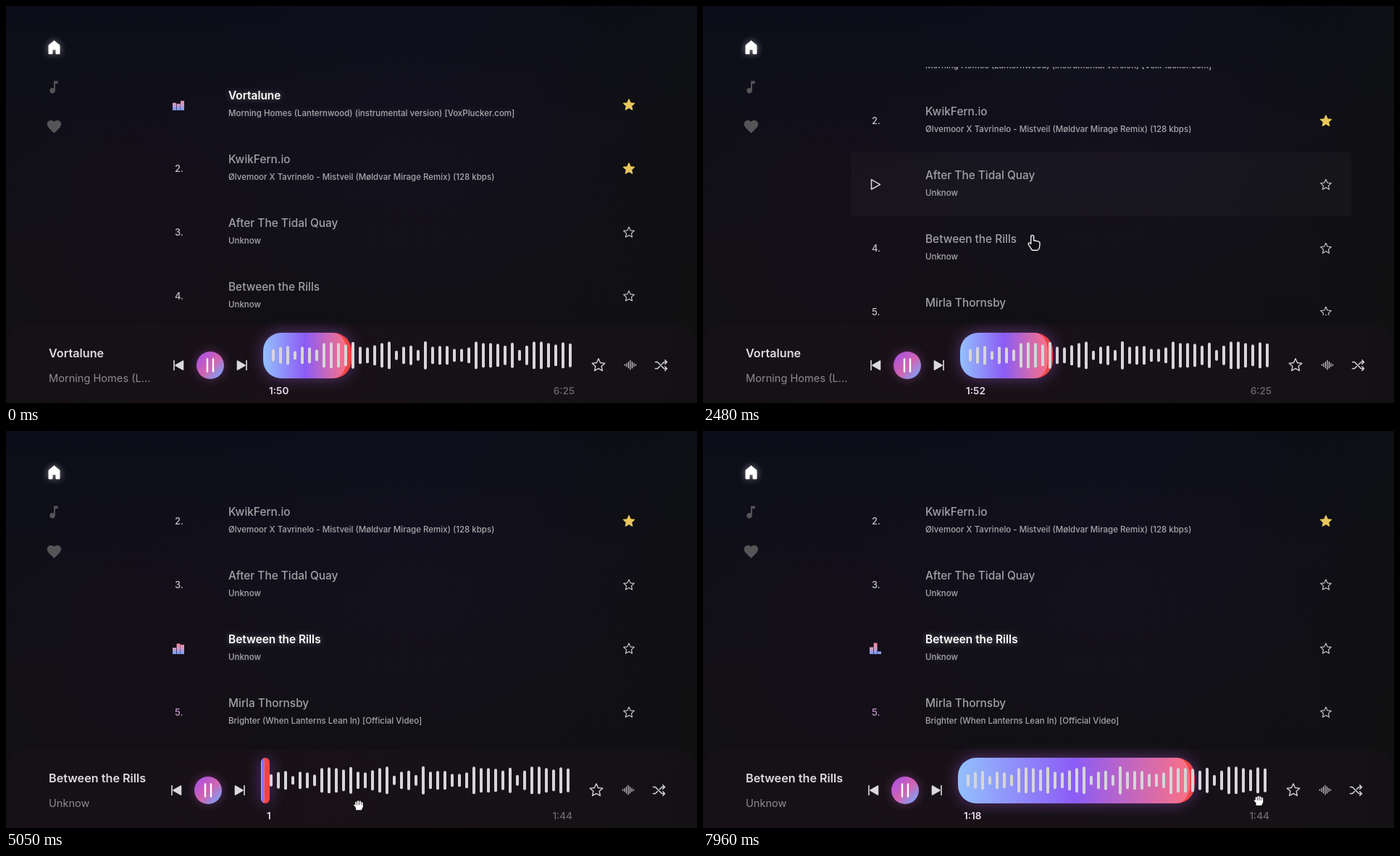
An HTML page for the animation above (8 s loop, 954 by 548 pixels).

```html
<!DOCTYPE html>
<html lang="en">
<head>
<meta charset="utf-8">
<title>Music player</title>
<style>
  html, body { margin: 0; width: 100%; height: 100%; overflow: hidden; background: #100f14; }
  #stage {
    position: relative; width: 954px; height: 548px; overflow: hidden;
    font-family: Inter, "Open Sans", sans-serif;
    background:
      radial-gradient(ellipse 190px 260px at 190px 310px, rgba(32, 12, 36, .22), transparent),
      radial-gradient(ellipse 360px 260px at 560px 190px, rgba(24, 18, 40, .4), transparent),
      linear-gradient(90deg, transparent 65%, rgba(15, 16, 16, .6)),
      linear-gradient(#0b0e1a, #100f18 30%, #121015 62%, #111013);
  }
  #player {
    position: absolute; left: 0; top: 440px; width: 954px; height: 108px;
    border-radius: 28px 28px 0 0;
    background: linear-gradient(90deg, #161117, #181217 45%, #141115);
  }
  #progress {
    position: absolute; top: 451px; height: 63px;
    border-right: 7px solid #ef4444; border-radius: 25px;
    background: linear-gradient(90deg, #93c0fd, #8b5cf6 50%, #fb7185);
    box-shadow: 0 0 20px rgba(160, 85, 215, .5);
  }
  #pause {
    position: absolute; top: 477px; width: 38px; height: 38px; border-radius: 50%;
    background: linear-gradient(135deg, #b153dc 15%, #d264b0 52%, #7f9ff5 88%);
    box-shadow: 0 0 14px rgba(190, 80, 190, .4);
  }
  svg { position: absolute; inset: 0; }
  text { white-space: pre; }
  .title { font-size: 15.4px; font-weight: 500; fill: #a1a1a4; }
  .sub { font-size: 11.5px; font-weight: 500; fill: #a8a8ab; }
  .num { font-size: 13px; font-weight: 500; fill: #c4c4c8; }
  .active .title { font-weight: 600; fill: #fff; filter: drop-shadow(0 0 4px rgba(255, 255, 255, .35)); }
  .active .sub { filter: drop-shadow(0 0 4px rgba(255, 255, 255, .12)); }
  .song { font-size: 16.2px; font-weight: 600; fill: #dcdcde; }
  .artist { font-size: 14.6px; fill: #8c8c90; }
  .time { font-size: 13.6px; font-weight: 600; fill: #e6dced; }
  .total { font-size: 13.6px; font-weight: 500; fill: #6c6a6e; }
  .line { fill: none; stroke: #d4d4d6; stroke-linecap: round; stroke-linejoin: round; }
</style>
</head>
<body>
<div id="stage">
  <div id="player"></div>
  <div id="progress"></div>
  <div id="pause"></div>
  <svg width="954" height="548" viewBox="0 0 954 548">
    <defs>
      <clipPath id="view"><rect x="200" y="84" width="700" height="343"/></clipPath>
      <linearGradient id="eqFill" gradientUnits="userSpaceOnUse" x1="0" y1="36" x2="0" y2="52">
        <stop offset="0" stop-color="#fb7f8f"/>
        <stop offset=".5" stop-color="#d29ac8"/>
        <stop offset="1" stop-color="#6f9dfa"/>
      </linearGradient>
    </defs>

    <path d="M59 54.2L66.5 48l7.5 6.2V66h-5v-6h-5v6h-5z" fill="#fff" stroke="#fff" stroke-linejoin="round"
      style="filter:drop-shadow(0 0 5px rgba(255,255,255,.5))"/>
    <g fill="#555457">
      <path transform="translate(54.5 100.5) scale(.96)"
        d="M12 3v10.55c-.59-.34-1.27-.55-2-.55-2.21 0-4 1.79-4 4s1.79 4 4 4 4-1.79 4-4V7h4V3z"/>
      <path transform="translate(54.8 154.8) scale(.97)"
        d="M12 21.35l-1.45-1.32C5.4 15.36 2 12.28 2 8.5 2 5.42 4.42 3 7.5 3c1.74 0 3.41.81 4.5 2.09C13.09 3.81 14.76 3 16.5 3 19.58 3 22 5.42 22 8.5c0 3.78-3.4 6.86-8.55 11.54z"/>
    </g>

    <g clip-path="url(#view)"><g id="list"></g></g>

    <text id="song" class="song" x="59" y="485"></text>
    <text id="artist" class="artist" x="59" y="519"></text>

    <g id="controls">
      <g fill="#dadadc" stroke="#dadadc" stroke-width="1.6" stroke-linejoin="round">
        <path d="M244.5 490v12l-10.5-6zM232 489v14"/>
        <path d="M319.5 490v12l10.5-6zM332 489v14"/>
      </g>
      <path d="M278 487.5v17M286 487.5v17" class="line" style="stroke:#fff" stroke-width="2.4"/>
      <g id="wave" fill="#d6d5d8"></g>
      <text id="time" class="time" x="363" y="536"></text>
      <text id="total" class="total" x="785" y="536" text-anchor="end"></text>
      <path id="playerStar" class="line" stroke-width="1.4" transform="translate(818 496)"/>
      <path class="line" stroke-width="1.2" transform="translate(862 495.5)"
        d="M-7.5-.7v1.4M-5-2.2v4.4M-2.5-4.2v8.4M0-6.3v12.6M2.5-4.2v8.4M5-2.2v4.4M7.5-.7v1.4"/>
      <path class="line" stroke-width="1.6" transform="translate(904.5 496)"
        d="M-8-4.5h3l9 9h4M-8 4.5h3l3-3M1-1.5l3-3h4M5.3-7.2L8-4.5 5.3-1.8M5.3 1.8L8 4.5 5.3 7.2"/>
    </g>

    <g id="cursor">
      <path id="pointer" fill="#0d0c12" stroke="#f2f2f2" stroke-width="1.4" stroke-linejoin="round"
        d="M-4.3-8.5a2 2 0 0 1 4 0V-3h1.8q4 .5 5.6 1.6 1.2.8 1 2.6L7.5 6q-.6 3.8-3.5 4.3H-1q-2 0-3-2.2L-7.5 2.4q-1-2 .8-2.5 1.3-.2 2.4 1.6z"/>
      <g id="grab" stroke="#fff" stroke-linecap="round" stroke-linejoin="round">
        <path stroke-width="2" d="M-3.2-4v5M-.4-5.2V1M2.4-4.8V1M5.1-3.2V1"/>
        <path fill="#fff" d="M-5.8 0l2.8 3.6V6.3h7l1.8-4V.5h-9.4z"/>
      </g>
    </g>
  </svg>
</div>

<script>
const LOOP = 8000, FRAME = 85.6, ROW = 88;
const SWITCH = 3500, GRAB = 4500, SEEK = 5700;
const $ = id => document.getElementById(id);

const rows = [
  { title: 'Vortalune', sub: 'Morning Homes (Lanternwood) (instrumental version) [VoxPlucker.com]', fav: true },
  { title: 'KwikFern.io', sub: 'Ølvemoor X Tavrinelo - Mistveil (Møldvar Mirage Remix) (128 kbps)', fav: true },
  { title: 'After The Tidal Quay', sub: 'Unknow', hover: [1790, 3330] },
  { title: 'Between the Rills', sub: 'Unknow', hover: [3330, 4270] },
  { title: 'Mirla Thornsby', sub: 'Brighter (When Lanterns Lean In) [Official Video]', hover: [4080, 4440] }
];
const waveHeights = [17, 23, 26, 12, 24, 22, 16, 34, 36, 34, 30, 37, 24, 22, 28, 34, 38, 13, 24, 27, 15,
  39, 24, 26, 26, 18, 18, 22, 38, 34, 34, 32, 27, 35, 15, 27, 38, 38, 34, 30, 36, 33];

// Each key is [time, value, ...]
const cursorKeys = [[1790, 500, 100], [1880, 462, 315], [2200, 457, 327], [4020, 457, 327], [4190, 411, 376],
  [4450, 425, 465], [4720, 465, 538], [4880, 480, 529], [5300, 496, 498], [5650, 498, 495],
  [6510, 561, 498], [6850, 624, 501], [7360, 651, 504], [7960, 767, 510]];
const progressKeys = [[0, 477], [2740, 484], [SWITCH, 484], [SWITCH, 359], [4190, 359], [5480, 367],
  [5650, 486], [5740, 499], [6510, 562], [6850, 624], [7360, 650], [7960, 679]];
const scrollKeys = [[2250, 0], [2400, 45], [2570, 88], [2740, 100]];

function track(keys, t) {
  const next = keys.findIndex(key => key[0] > t);
  if (next === 0) return keys[0].slice(1);
  if (next < 0) return keys[keys.length - 1].slice(1);
  const a = keys[next - 1], b = keys[next], k = (t - a[0]) / (b[0] - a[0]);
  return a.slice(1).map((v, i) => v + (b[i + 1] - v) * k);
}

function add(parent, tag, attrs, text = '') {
  const node = document.createElementNS('http://www.w3.org/2000/svg', tag);
  for (const name in attrs) node.setAttribute(name, attrs[name]);
  node.textContent = text;
  return parent.appendChild(node);
}

function starPath(radius) {
  let d = '';
  for (let i = 0; i < 10; i++) {
    const r = i % 2 ? radius * .47 : radius, a = i * Math.PI / 5;
    d += (i ? 'L' : 'M') + (r * Math.sin(a)).toFixed(2) + ' ' + (-r * Math.cos(a)).toFixed(2);
  }
  return d + 'z';
}

const clamp = v => Math.max(0, Math.min(1, v));
const clock = s => s < 60 ? `${s}` : `${Math.floor(s / 60)}:${String(s % 60).padStart(2, '0')}`;
const show = (node, on) => node.style.display = on ? '' : 'none';

rows.forEach((row, i) => {
  const g = row.node = add($('list'), 'g', { transform: `translate(0 ${92 + i * ROW})` });
  row.back = add(g, 'rect', { x: 205, width: 690, height: ROW, fill: '#fff' });
  row.num = add(g, 'text', { class: 'num', x: 233, y: 48.5 }, `${i + 1}.`);
  row.play = add(g, 'path', { class: 'line', 'stroke-width': 1.6, d: 'M232.5 37.5v13.4l12-6.7z' });
  row.eq = add(g, 'g', {});
  row.bars = [230, 235.6, 241].map(x => add(row.eq, 'rect', { x, width: 5 }));
  add(g, 'text', { class: 'title', x: 307, y: 36.5 }, row.title);
  add(g, 'text', { class: 'sub', x: 307, y: 60 }, row.sub);
  add(g, 'path', {
    d: starPath(row.fav ? 8 : 7.7), transform: 'translate(860 44.8)', 'stroke-linejoin': 'round',
    'stroke-width': 1.2, fill: row.fav ? '#e9c75c' : 'none', stroke: row.fav ? '#e9c75c' : '#c8c8ca'
  });
});
waveHeights.forEach((h, i) =>
  add($('wave'), 'rect', { x: 367 + i * 10, y: 482.3 - h / 2, width: 4, height: h, rx: 2 }));
$('playerStar').setAttribute('d', starPath(9.2));

function drawRow(row, i, t, current) {
  const active = i === current;
  const [on, off] = row.hover || [Infinity, Infinity];
  const hovered = t >= on && t < off;
  row.back.setAttribute('opacity', .023 * clamp((t - on + 90) / 90) * clamp((off + 90 - t) / 90));
  row.node.setAttribute('class', active ? 'active' : '');
  show(row.eq, active);
  show(row.play, hovered && !active);
  show(row.num, !hovered && !active);
  if (!active) return;
  const beat = current ? Math.max(t, 4020) : t;
  const speeds = [.0075, .0068, .0072], phases = current ? [3.1, -2, 3.9] : [.1, -.1, .6];
  row.bars.forEach((bar, n) => {
    const h = 9.7 + 6 * Math.sin(beat * speeds[n] + phases[n]);
    bar.setAttribute('y', 52 - h);
    bar.setAttribute('height', h);
  });
  row.eq.setAttribute('fill', current && t < 4300 ? '#b3a6c0' : 'url(#eqFill)');
}

function render(t) {
  const second = t >= SWITCH, current = second ? 3 : 0, shift = second ? -3 : 0;
  const left = 355 + shift, [end] = track(progressKeys, t);

  $('list').setAttribute('transform', `translate(0 ${-track(scrollKeys, t)[0]})`);
  rows.forEach((row, i) => drawRow(row, i, t, current));
  rows[4].num.style.fill = t > GRAB ? '#c79bcb' : '';

  $('controls').setAttribute('transform', `translate(${shift} 0)`);
  $('pause').style.left = 263 + shift + 'px';
  $('progress').style.left = left + 'px';
  $('progress').style.width = Math.max(0, end - left - 7) + 'px';

  const ticks = second ? [4600, 5400] : [950, 1950, 2650];
  const played = ticks.filter(tick => t >= tick).length + (second ? 0 : 110);
  const seconds = t >= SEEK ? Math.floor((end - left) / 433 * 104) : played;
  $('time').textContent = clock(seconds);
  $('total').textContent = clock(second ? 104 : 385);
  $('song').textContent = rows[current].title;
  $('artist').textContent = second ? rows[3].sub : 'Morning Homes (L...';

  const [x, y] = track(cursorKeys, t);
  show($('cursor'), t >= 1780);
  show($('pointer'), t < GRAB);
  show($('grab'), t >= GRAB);
  $('cursor').setAttribute('transform', `translate(${x} ${y})`);
}

const start = performance.now();
function tick() {
  const t = (performance.now() - start) % LOOP;
  render(Math.floor((t + 8) / FRAME) * FRAME);
  requestAnimationFrame(tick);
}
tick();
</script>
</body>
</html>
```
